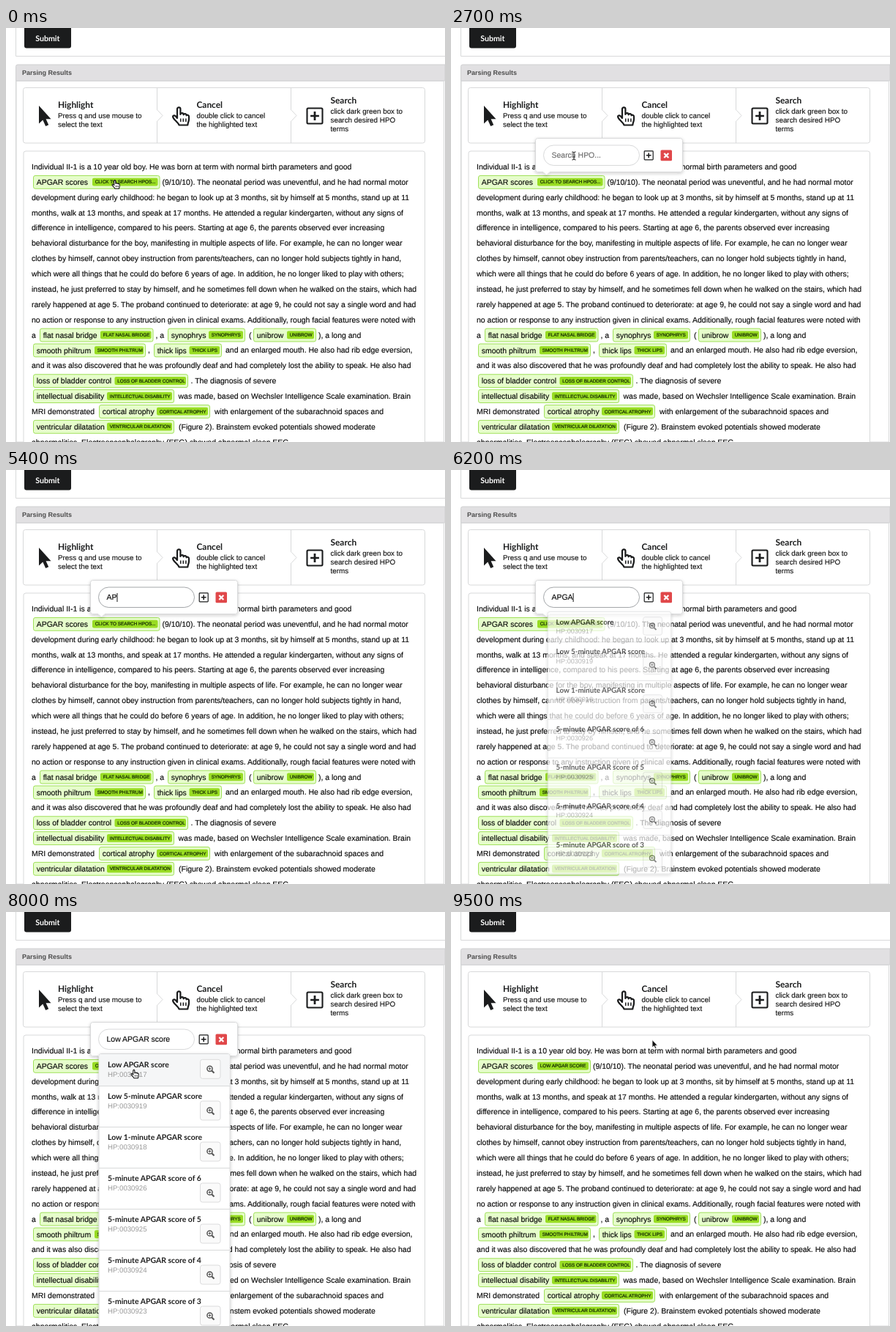
These frames come from a looping animation (600x565 px, 9.6 s). An HTML page:

```html
<!DOCTYPE html>
<html lang="en">
<head>
<meta charset="utf-8">
<title>Parsing results</title>
<style>
  html, body { margin: 0; width: 100%; height: 100%; overflow: hidden; background: #fff; }
  svg { display: block; width: 600px; height: 565px; }
  text { font-family: "Liberation Sans", Arial, sans-serif; text-rendering: geometricPrecision; white-space: pre; }
  .body { font-size: 10.47px; fill: #080808; stroke: #080808; stroke-width: .14px; }
  .badge { font-size: 6.4px; fill: #122800; stroke: #122800; stroke-width: .22px; }
  .title { font: 700 11.9px Lato, sans-serif; fill: #1b1c1d; }
  .desc { font-size: 9.85px; fill: #111; stroke: #111; stroke-width: .12px; }
  .name { font: 700 10.44px Lato, sans-serif; fill: #1f1f1f; }
  .code { font-size: 9.65px; fill: #999; }
  .box { fill: #fff; stroke: #d8d9da; }
  .line { fill: none; stroke: #d8d9da; }
</style>
</head>
<body>
<svg id="stage" viewBox="0 0 600 565">
  <defs>
    <filter id="shadow" x="-10%" y="-10%" width="120%" height="130%">
      <feDropShadow dx="0" dy="1.5" stdDeviation="2.2" flood-color="#222426" flood-opacity=".22"/>
    </filter>
    <path id="hand" d="M7 15.5V3a2.2 2.2 0 0 1 4.4 0V10.5a2.1 2.1 0 0 1 4.2 .3a2.1 2.1 0 0 1 4 1a2 2 0 0 1 3.4 1.6V17c0 3-1.4 4.5-1.7 8H9.5C8.5 21.5 3 18.5 1.3 14.5C.4 11.8 3.4 10.8 5 13Z"/>
    <path id="fingers" d="M11.7 16v4.5M15.3 16v4.5M18.9 16v4.5"/>
    <path id="beam" d="M-2.5-5.5Q0-5.5 0-4Q0-5.5 2.5-5.5M0-4V4M-2.5 5.5Q0 5.5 0 4Q0 5.5 2.5 5.5M-1.5 1.5H1.5"/>
    <g id="plusBox" fill="none" stroke="#1b1c1d">
      <rect x="-.5" y="-.5" width="1" height="1" rx=".07" stroke-width=".1"/>
      <path d="M-.28 0H.28M0-.28V.28" stroke-width=".13"/>
    </g>
  </defs>
  <g id="page"></g>
  <g id="scoreLine"></g>
  <g id="popup"></g>
  <g id="results"></g>
  <g id="cursor">
    <g id="handCursor" stroke="#111" stroke-linejoin="round" transform="translate(-5 -6.5) scale(.47)">
      <use href="#hand" fill="#fff" stroke-width="2.2"/>
      <use href="#fingers" stroke-width="1.5"/>
    </g>
    <g id="beamCursor" fill="none">
      <use href="#beam" stroke="#fff" stroke-width="2.2"/>
      <use href="#beam" stroke="#111"/>
    </g>
    <path id="arrowCursor" d="M0 0V10.5L2.4 8.3L4.1 12L5.8 11.2L4.2 7.7H7.4Z" fill="#111" stroke="#fff" stroke-width=".8"/>
  </g>
</svg>
<script>
const LOOP = 9600;
const el = id => document.getElementById(id);
const text = (x, y, s, cls, extra = '') => `<text x="${x}" y="${y}" class="${cls}" ${extra}>${s}</text>`;
const rect = (x, y, w, h, r, attrs) => `<rect x="${x}" y="${y}" width="${w}" height="${h}" rx="${r}" ${attrs}/>`;
const plusBox = (x, y, size) => `<use href="#plusBox" transform="translate(${x} ${y}) scale(${size})"/>`;
const baseline = row => 193 + 20.87 * row;

// Plain rows are strings; mixed rows hold [x, text] and [x, label, badge x, badge, end x].
const rows = [
  'Individual II-1 is a 10 year old boy. He was born at term with normal birth parameters and good',
  [],
  'development during early childhood: he began to look up at 3 months, sit by himself at 5 months, stand up at 11',
  'months, walk at 13 months, and speak at 17 months. He attended a regular kindergarten, without any signs of',
  'difference in intelligence, compared to his peers. Starting at age 6, the parents observed ever increasing',
  'behavioral disturbance for the boy, manifesting in multiple aspects of life. For example, he can no longer wear',
  'clothes by himself, cannot obey instruction from parents/teachers, can no longer hold subjects tightly in hand,',
  'which were all things that he could do before 6 years of age. In addition, he no longer liked to play with others;',
  'instead, he just preferred to stay by himself, and he sometimes fell down when he walked on the stairs, which had',
  'rarely happened at age 5. The proband continued to deteriorate: at age 9, he could not say a single word and had',
  'no action or response to any instruction given in clinical exams. Additionally, rough facial features were noted with',
  [[35, 'a'], [46, 'flat nasal bridge', 129, 'FLAT NASAL BRIDGE', 201.5], [204.5, ', a'],
    [221, 'synophrys', 277, 'SYNOPHRYS', 327], [332, '('],
    [338, 'unibrow', 384, 'UNIBROW', 424], [427, '), a long and']],
  [[37, 'smooth philtrum', 121, 'SMOOTH PHILTRUM', 191], [194, ','],
    [202, 'thick lips', 250.5, 'THICK LIPS', 295], [300, 'and an enlarged mouth. He also had rib edge eversion,']],
  'and it was also discovered that he was profoundly deaf and had completely lost the ability to speak. He also had',
  [[37, 'loss of bladder control', 148.5, 'LOSS OF BLADDER CONTROL', 249], [252.5, '. The diagnosis of severe']],
  [[37, 'intellectual disability', 138, 'INTELLECTUAL DISABILITY', 230],
    [235.5, 'was made, based on Wechsler Intelligence Scale examination. Brain']],
  [[35, 'MRI demonstrated'], [127, 'cortical atrophy', 206, 'CORTICAL ATROPHY', 279],
    [285, 'with enlargement of the subarachnoid spaces and']],
  [[37, 'ventricular dilatation', 138, 'VENTRICULAR DILATATION', 230],
    [236, '(Figure 2). Brainstem evoked potentials showed moderate']],
  'abnormalities. Electroencephalography (EEG) showed abnormal sleep EEG',
];

function tag(x, row, label, badgeX, badge, end) {
  const y = baseline(row);
  return rect(x + .5, y - 12.4, end - x - 1, 17.8, 2.5, 'fill="#e6fdcb" stroke="#a0e05a"')
    + rect(badgeX, y - 9.1, end - badgeX - 3, 10.8, 2, 'fill="#98dc22"')
    + text(x + 4.7, y + .3, label, 'body') + text(badgeX + 3.7, y - 1.4, badge, 'badge');
}

function drawRow(row, i) {
  if (typeof row === 'string') return text(35, baseline(i), row, 'body');
  return row.map(p => p.length === 2 ? text(p[0], baseline(i), p[1], 'body')
    : tag(p[0], i, ...p.slice(1))).join('');
}

function step(x, y, title, lines) {
  return text(x, y, title, 'title') + lines.map((s, i) => text(x, y + 14 + 12 * i, s, 'desc')).join('');
}

const divider = x => `<path class="line" d="M${x} 82V157"/><path d="M${x} 111.5l7.5 8l-7.5 8" fill="#fff" stroke="#d8d9da"/>`
  + `<path d="M${x} 112.5v14" stroke="#fff" stroke-width="2"/>`;

el('page').innerHTML =
  '<path class="line" d="M13.5 0V38.5H600"/>'
  + rect(25, -6, 64, 33.5, 3, 'fill="#1b1c1d"')
  + text(56.8, 18, 'Submit', 'title', 'text-anchor="middle" style="fill:#fff;font-size:10.6px"')
  + '<path d="M13.5 565V52.5q0-2.5 2.5-2.5H600V72H13.5" fill="#e1e0e2" stroke="#d0d1d2"/>'
  + '<path d="M14 72.5H598.5V565H14Z" class="box"/>'
  + text(22, 64, 'Parsing Results', '', 'font-size="9" font-weight="700" fill="#4c4c4c"')
  + rect(23.5, 81.5, 549, 75.5, 3, 'class="box"') + divider(206.5) + divider(389.5)
  + '<path d="M45 106V130.5L50.3 125.5L54.2 134L58.2 132.3L54.6 124.2H61.5Z" fill="#1b1c1d"/>'
  + '<g transform="translate(227 107.5)" fill="none" stroke="#1b1c1d" stroke-linejoin="round">'
  + '<use href="#hand" stroke-width="2.2"/><use href="#fingers" stroke-width="1.5"/></g>'
  + plusBox(422, 120, 21)
  + step(71, 109.2, 'Highlight', ['Press q and use mouse to', 'select the text'])
  + step(260.5, 109.2, 'Cancel', ['double click to cancel', 'the highlighted text'])
  + step(443.5, 103.2, 'Search', ['click dark green box to', 'search desired HPO', 'terms'])
  + rect(24, 168, 548.5, 420, 3, 'class="box"')
  + rows.map(drawRow).join('');

const scoreRow = (badge, end) => drawRow([[37, 'APGAR scores', 118, badge, end],
  [end + 3, '(9/10/10). The neonatal period was uneventful, and he had normal motor']], 1);
const scoreRows = [scoreRow('CLICK TO SEARCH HPOS...', 210.5), scoreRow('LOW APGAR SCORE', 191)];

el('popup').innerHTML =
  '<path filter="url(#shadow)" class="box" d="M118.5 150.5H313.5q3 0 3 3V193.5q0 3-3 3H135l-4.5 4.5l-4.5-4.5H118.5q-3 0-3-3V153.5q0-3 3-3Z"/>'
  + rect(126.5, 160, 131, 27.5, 13.7, 'id="field" fill="#fff"')
  + text(137.5, 177.3, '', 'body', 'id="query"')
  + '<path id="caret" d="M0 168V180" stroke="#111"/>'
  + plusBox(270.2, 173.8, 12)
  + rect(286.5, 166.5, 15.5, 14.8, 1.5, 'fill="#e0484a"')
  + '<path d="M291.3 171l6 6m0-6l-6 6" stroke="#fff" stroke-width="2.3"/>';

const findings = [['Low APGAR score', 17], ['Low 5-minute APGAR score', 19], ['Low 1-minute APGAR score', 18],
  ...[6, 5, 4, 3].map(n => ['5-minute APGAR score of ' + n, 20 + n])];

function finding([name, code], i) {
  const top = 237.5 + 56 * (i - 1);
  const y = i ? top + 17.5 : 212;
  const mid = i ? top + 33.5 : 214.3;
  return text(139, y, name, 'name') + text(139, y + 13, 'HP:00309' + code, 'code')
    + rect(265.5, mid - 13, 27.5, 26, 3, 'fill="#fafafa" stroke="#dcdcdd"')
    + `<g transform="translate(278.5 ${mid - .5})" fill="none" stroke="#555"><circle r="3.6" stroke-width="1.5"/>`
    + '<path d="M2.7 2.7L6 6" stroke-width="2"/><path d="M-1.9 0H1.9M0-1.9V1.9"/></g>'
    + (i < 6 ? `<path class="line" d="M127 ${top + 56}H306"/>` : '');
}

el('results').innerHTML =
  rect(127, 193.5, 179, 380, 3, 'class="box" filter="url(#shadow)"')
  + rect(127.5, 194, 178, 43, 2, 'id="hover" fill="#f5f6f7"')
  + findings.map(finding).join('');

const clamp = v => Math.max(0, Math.min(1, v));
const ease = v => Math.sin(clamp(v) * Math.PI / 2);
const appear = (t, start, end) => ease((t - start) / 200) * (1 - ease((t - end) / 200));
const show = (id, on) => el(id).setAttribute('visibility', on ? 'visible' : 'hidden');

function zoom(id, p, ox, oy) {
  const k = .8 + .2 * p;
  el(id).setAttribute('opacity', p);
  el(id).setAttribute('transform', `translate(${ox * (1 - k)} ${oy * (1 - k)}) scale(${k})`);
}

// Pointer stops: time, x, y
const path = [[0, 149.5, 214], [400, 149.5, 214], [800, 150, 230.5], [1200, 150, 230.5], [1500, 150, 213],
  [2200, 150, 213], [2600, 168, 174.5], [7400, 168, 174.5], [7700, 175.5, 221.5], [8400, 175.5, 221.5],
  [9000, 270, 175], [9300, 270, 175], [9500, 275, 174.5]];

function pointer(t) {
  const i = path.findIndex(p => p[0] > t);
  if (i < 0) return path[path.length - 1].slice(1);
  const [t0, x0, y0] = path[i - 1], [t1, x1, y1] = path[i];
  const u = (t - t0) / (t1 - t0), s = u * u * (3 - 2 * u);
  return [x0 + (x1 - x0) * s, y0 + (y1 - y0) * s];
}

const typing = [[4900, 'A'], [5200, 'AP'], [5800, 'APG'], [6000, 'APGA'], [7800, 'Low APGAR score']];

let shownRow;
function render(t) {
  const chosen = t >= 9400 ? 1 : 0;
  if (shownRow !== chosen) el('scoreLine').innerHTML = scoreRows[shownRow = chosen];

  zoom('popup', appear(t, 1900, 9300), 131, 202);
  zoom('results', appear(t, 6100, 8200), 216.5, 192);
  show('hover', t >= 7600);

  const typed = typing.reduce((s, [at, value]) => t >= at ? value : s, '');
  const focused = t >= 2900 && t < 7800;
  const query = el('query');
  query.textContent = typed || 'Search HPO...';
  query.style.fill = query.style.stroke = typed ? '#080808' : '#6c6c6c';
  el('field').setAttribute('stroke', focused ? '#a3a6a9' : '#d8d9da');
  const caretX = 138 + (typed ? query.getComputedTextLength() : 0);
  el('caret').setAttribute('transform', `translate(${caretX} 0)`);
  show('caret', focused && (t >= 4900 || Math.floor((t - 2900) / 500) % 2 === 0));

  const [x, y] = pointer(t);
  const visible = t < 4900 || t >= 7400;
  const onBadge = t < 2400 && y < 220;
  const onResult = t >= 7600 && t < 8800 && y > 190;
  const onButton = t >= 8900 && t < 9400;
  const hand = onBadge || onResult || onButton;
  const arrow = !hand && t >= 8400;
  el('cursor').setAttribute('transform', `translate(${x} ${y})`);
  show('handCursor', visible && hand);
  show('arrowCursor', visible && arrow);
  show('beamCursor', visible && !hand && !arrow);
}

const start = performance.now();
function tick() {
  const t = (performance.now() - start) % LOOP;
  render(Math.floor(t / 100) * 100);
  requestAnimationFrame(tick);
}
tick();
</script>
</body>
</html>
```
